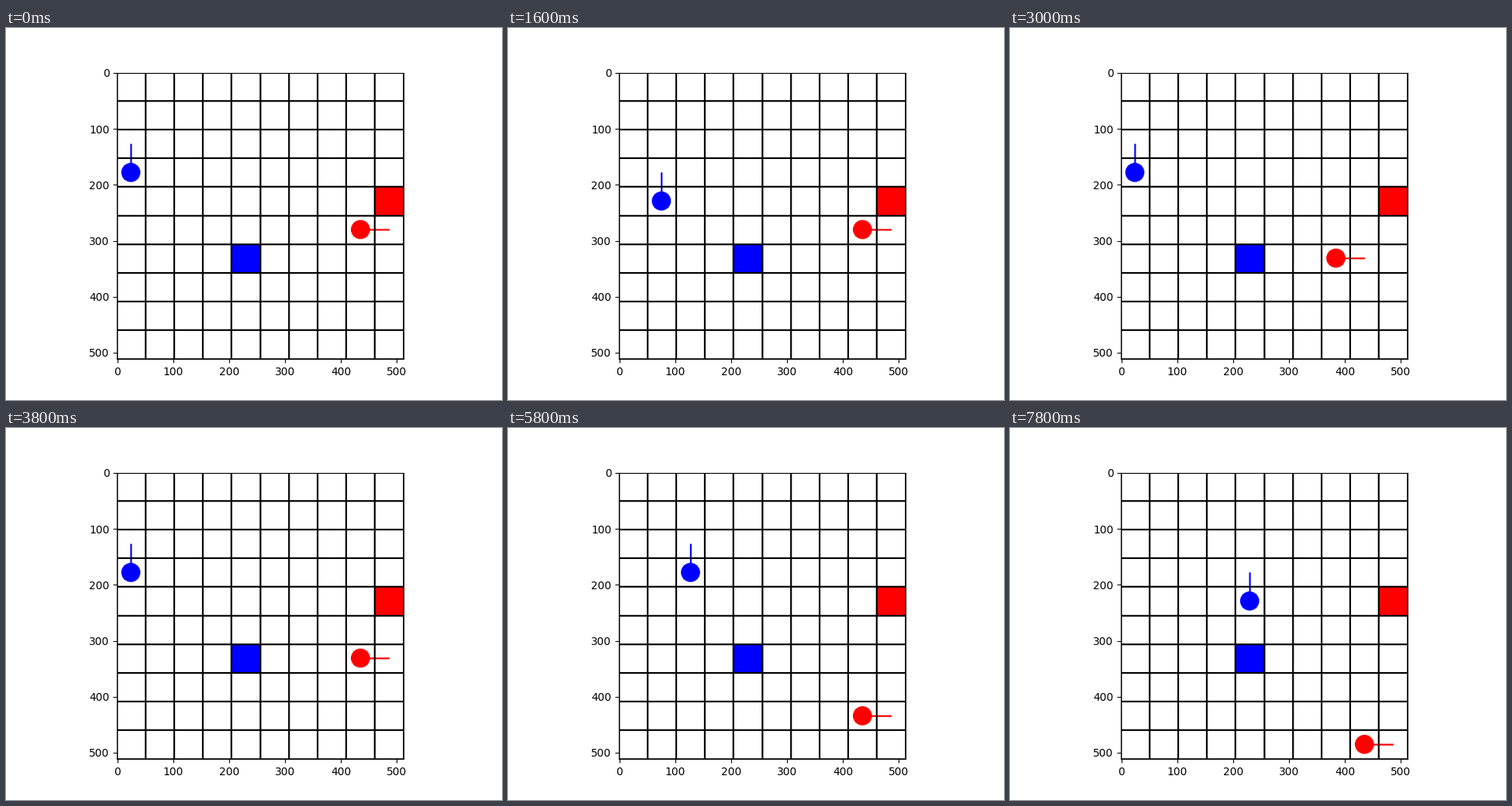
A matplotlib script for the animation above (8000 ms loop, 640 by 480 pixels).

```python
import matplotlib.pyplot as plt
import numpy as np
from matplotlib.animation import FuncAnimation

SIZE = 512
CELLS = 10
CELL = SIZE / CELLS
STEP_MS = 200
STEPS = 40

RED = (255, 0, 0)
BLUE = (0, 0, 255)
BLACK = (0, 0, 0)
WHITE = (255, 255, 255)

MOVES = {"U": (0, -1), "D": (0, 1), "L": (-1, 0), "R": (1, 0)}

# start cell, facing direction, and the step at which each move happens
AGENTS = [
    dict(color=RED, start=(8, 5), facing="R",
         moves={3: "U", 7: "D", 11: "D", 15: "L", 19: "R", 23: "D",
                27: "D", 31: "U", 35: "D", 39: "D"}),
    dict(color=BLUE, start=(0, 3), facing="U",
         moves={5: "D", 8: "R", 11: "U", 14: "L", 20: "U", 23: "R",
                26: "D", 29: "R", 32: "D", 35: "R", 38: "R"}),
]
TARGETS = [(RED, (9, 4)), (BLUE, (4, 6))]

rows, cols = np.mgrid[:SIZE, :SIZE]


def fill_cell(img, cell, color):
    x, y = (int(v * CELL) for v in cell)
    side = int(CELL)
    img[y:y + side + 1, x:x + side + 1] = color


def fill_circle(img, center, radius, color):
    x, y = (int(v) for v in center)
    inside = (cols + 0.5 - x) ** 2 + (rows + 0.5 - y) ** 2 <= radius ** 2
    img[inside] = color


def draw_line(img, start, end, color):
    """Horizontal or vertical line, three pixels wide."""
    (x0, x1), (y0, y1) = (sorted((int(a), int(b))) for a, b in zip(start, end))
    if x0 == x1:
        img[max(y0, 0):y1 + 1, max(x0 - 1, 0):x0 + 2] = color
    else:
        img[max(y0 - 1, 0):y0 + 2, max(x0, 0):x1 + 1] = color


def position(agent, step):
    x, y = agent["start"]
    for when, move in agent["moves"].items():
        if when <= step:
            dx, dy = MOVES[move]
            x, y = x + dx, y + dy
    return x, y


def draw_agent(img, agent, step):
    x, y = ((v + 0.5) * CELL for v in position(agent, step))
    dx, dy = MOVES[agent["facing"]]
    fill_circle(img, (x, y), int(CELL / 3), agent["color"])
    draw_line(img, (x, y), (x + dx * CELL, y + dy * CELL), agent["color"])


def render(step):
    img = np.full((SIZE, SIZE, 3), WHITE, dtype=np.uint8)
    for color, cell in TARGETS:
        fill_cell(img, cell, color)
    for agent in AGENTS:
        draw_agent(img, agent, step)
    for i in range(CELLS + 1):
        pos = i * CELL
        draw_line(img, (0, pos), (SIZE, pos), BLACK)
        draw_line(img, (pos, 0), (pos, SIZE), BLACK)
    return img


fig, ax = plt.subplots(figsize=(6.4, 4.8), dpi=100)
board = ax.imshow(render(0))


def update(step):
    board.set_data(render(step))
    return (board,)


anim = FuncAnimation(fig, update, frames=STEPS, interval=STEP_MS,
                     repeat=True, repeat_delay=0)
plt.show()
```
